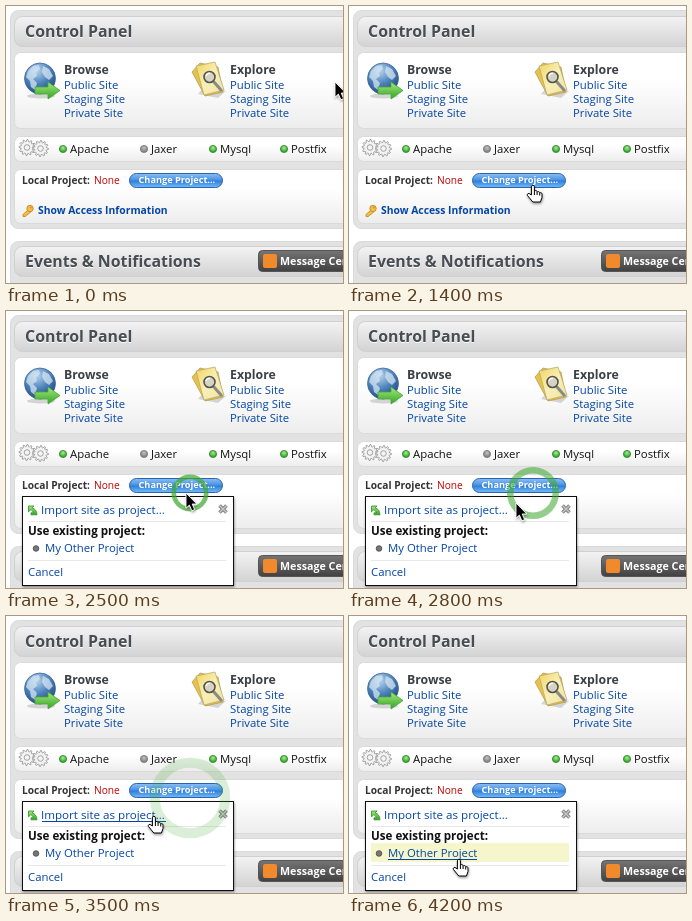
An HTML page that plays this animation: 337x277 px, repeating every 5.4 s.

```html
<!DOCTYPE html>
<html lang="en">
<head>
<meta charset="utf-8">
<title>Control Panel</title>
<style>
  html, body { margin: 0; width: 100%; height: 100%; overflow: hidden; background: #fff; }
  svg { display: block; }
  text { font: 11.35px "Open Sans", "Noto Sans", sans-serif; fill: #111; }
  .link { fill: #0345a4; }
  .bold { font-weight: 700; }
  .title { font-size: 15.9px; font-weight: 700; fill: #484c53; }
  .head { font-size: 12.3px; font-weight: 700; fill: #3c4047; }
  .small { font-size: 10.2px; }
  .box { fill: url(#soft); stroke: #dadada; }
  .bar { fill: url(#bar); stroke: #d0d0d0; }
  .panel { fill: #e2e2e2; stroke: #dadada; }
</style>
</head>
<body>
<svg width="337" height="277" viewBox="0 0 337 277">
  <defs>
    <linearGradient id="bar" x2="0" y2="1">
      <stop stop-color="#f3f3f3"/><stop offset="1" stop-color="#d3d3d3"/>
    </linearGradient>
    <linearGradient id="soft" x2="0" y2="1">
      <stop offset=".35" stop-color="#fff"/><stop offset="1" stop-color="#ededed"/>
    </linearGradient>
    <linearGradient id="blue" x2="0" y2="1">
      <stop stop-color="#8cc0f4"/><stop offset=".48" stop-color="#4790e4"/>
      <stop offset=".52" stop-color="#2f7cd8"/><stop offset="1" stop-color="#72bdf8"/>
    </linearGradient>
    <linearGradient id="dark" x2="0" y2="1">
      <stop stop-color="#757575"/><stop offset="1" stop-color="#414141"/>
    </linearGradient>
    <linearGradient id="leaf" x2="0" y2="1">
      <stop stop-color="#a5e878"/><stop offset="1" stop-color="#35a52a"/>
    </linearGradient>
    <linearGradient id="paper" x2="1" y2="1">
      <stop stop-color="#f0d460"/><stop offset=".5" stop-color="#f8f0b8"/><stop offset="1" stop-color="#efe3a0"/>
    </linearGradient>
    <radialGradient id="sea" cx=".4" cy=".25" r=".8">
      <stop stop-color="#b9d5ee"/><stop offset=".5" stop-color="#4f86bd"/><stop offset="1" stop-color="#1a457c"/>
    </radialGradient>
    <radialGradient id="on" cy=".35"><stop stop-color="#a6ee94"/><stop offset="1" stop-color="#36ad2f"/></radialGradient>
    <radialGradient id="off" cy=".35"><stop stop-color="#c2c2c2"/><stop offset="1" stop-color="#858585"/></radialGradient>
    <filter id="shade" x="-30%" y="-30%" width="180%" height="180%">
      <feDropShadow dx=".5" dy="1.5" stdDeviation="1.1" flood-opacity=".4"/>
    </filter>
  </defs>

  <rect class="panel" x="4.5" y="4.5" width="360" height="218" rx="8"/>
  <rect class="bar" x="8.5" y="10.5" width="360" height="30" rx="8"/>
  <rect class="box" x="8.5" y="46.5" width="360" height="76" rx="6"/>
  <rect class="box" x="8.5" y="130.5" width="360" height="25" rx="6"/>
  <rect class="box" x="8.5" y="163.5" width="360" height="54" rx="6"/>
  <rect class="panel" x="4.5" y="235.5" width="360" height="80" rx="8"/>
  <rect class="bar" x="8.5" y="240.5" width="360" height="30" rx="8"/>
  <g id="titles"></g>

  <!-- globe -->
  <ellipse cx="35" cy="90" rx="14" ry="2.5" fill="#000" opacity=".15"/>
  <circle cx="34" cy="72.5" r="15.5" fill="url(#sea)" stroke="#47699a" stroke-width=".8"/>
  <path d="M22 65l5-5 6-1 1 4-4 3 1 4-4 3 4 4-2 7-4-3-1-6-4-4zM37 60l6 3 4 7-4 4-4-3-3-5z" fill="#d4e4f0" opacity=".75"/>
  <path d="M29 81h13v-5l12 8.500-12 8.500v-5H29z" fill="url(#leaf)" stroke="#4aa63a" stroke-width=".8"/>

  <!-- note and lens -->
  <path d="M192 88l20 4 8-7-20-6z" fill="#000" opacity=".15"/>
  <path d="M186 66l8-9 18 4 5 25-18 4z" fill="#e6c24c" stroke="#b3964a" stroke-width=".7"/>
  <path d="M190 60l19-4 9 28-20 5z" fill="url(#paper)" stroke="#b5a468" stroke-width=".7"/>
  <path d="M208 76l7 8" stroke="#8a8a86" stroke-width="3" stroke-linecap="round"/>
  <circle cx="203.500" cy="71" r="5.500" fill="#d5d3c4" stroke="#55544c" stroke-width="1.600"/>
  <path d="M200 70a3.500 3.500 0 0 1 4-2.500" fill="none" stroke="#fff" stroke-width="1.300"/>

  <text class="head" x="58" y="68">Browse</text>
  <text class="head" x="224" y="68">Explore</text>
  <g id="sites"></g>

  <g id="gears" fill="#f4f4f4" stroke="#8d8d8d" stroke-width=".8"></g>
  <g id="services"></g>

  <text class="bold small" x="16" y="178" style="fill:#333">Local Project:</text>
  <text class="small" x="88" y="178" style="fill:#c00000">None</text>
  <rect x="123.500" y="167.500" width="93" height="14" rx="7" fill="url(#blue)" stroke="#2d63ae"/>
  <text class="bold" x="132.500" y="177" style="font-size:9.2px;fill:#fff">Change Project...</text>

  <g stroke="#c98a1e" fill="#f5bd4a" stroke-width=".9">
    <path d="M22 204l-5 4.500v2h2.500l1-1.500 1.500-.5 2.500-2.500z"/>
    <circle cx="24" cy="202.500" r="3.200"/>
    <circle cx="25" cy="201.500" r=".7" fill="#fff"/>
  </g>
  <text class="link bold" x="32" y="208" style="font-size:10.35px">Show Access Information</text>

  <rect x="252.500" y="244.500" width="110" height="21" rx="4" fill="url(#dark)" stroke="#555"/>
  <rect x="257" y="248" width="14" height="14" rx="2" fill="#f08a2c"/>
  <text class="bold" x="274" y="259" style="font-size:10.7px;fill:#fff">Message Center</text>

  <g id="menu">
    <rect x="16.500" y="185.500" width="211" height="89" fill="#fff" stroke="#111" filter="url(#shade)"/>
    <path d="M22 210.500h198M22 249.500h198" stroke="#e8e8e8"/>
    <rect id="row" x="22" y="227" width="198" height="19" fill="#f6f6cd"/>
    <path d="M22.500 195h5.500l-1.800 1.800c3 1.200 4.500 3 4.800 7h-6v-2h2.500c-.5-1.500-1.500-2.300-2.800-3l-2.200 2z" fill="url(#leaf)" stroke="#2c8c28" stroke-width=".8"/>
    <text class="link" x="35" y="203" style="font-size:11.6px">Import site as project...</text>
    <path id="line1" d="M36 205.500h124" stroke="#0345a4"/>
    <path d="M213.500 194.500l7 7m0-7l-7 7" stroke="#858585" stroke-width="3.600"/>
    <path d="M213.500 194.500l7 7m0-7l-7 7" stroke="#c8c8c8" stroke-width="1.300"/>
    <text class="bold" x="22" y="224" style="font-size:11.6px">Use existing project:</text>
    <circle cx="30" cy="237.500" r="2.800" fill="#777" stroke="#444" stroke-width=".8"/>
    <text class="link" x="39" y="241">My Other Project</text>
    <path id="line2" d="M39 243.500h89" stroke="#0345a4"/>
    <text class="link" x="22" y="265">Cancel</text>
  </g>

  <circle id="ring" cx="184" cy="182" fill="none" stroke="#40a830"/>

  <g id="cursor" filter="url(#shade)">
    <path id="arrow" d="M0 0V15.200L3.400 12.100 5.900 17.800 8.600 16.600 6.200 11H10.800Z" fill="#000" stroke="#fff" stroke-width=".9"/>
    <path id="hand" d="M-1.600 10V1.800a1.500 1.500 0 0 1 3 0V6.600a1.400 1.400 0 0 1 2.700 0V7.400a1.400 1.400 0 0 1 2.600 .2V8.400a1.200 1.200 0 0 1 2.300 .4V12.500L7.400 17H-.2L-5.600 10.400C-6.400 8.600-4.300 7.800-3 9ZM1.400 6.600V10M4.100 7.400V10M6.700 8.400V10.500" fill="#fff" stroke="#000"/>
  </g>
</svg>

<script>
const $ = id => document.getElementById(id);
const LOOP = 5400, STEP = 100;

// Static repeats
$('titles').innerHTML = [['Control Panel', 31], ['Events &amp; Notifications', 261]].map(([name, y]) =>
  `<text class="title" x="19" y="${y + 1}" style="fill:#fff">${name}</text>
   <text class="title" x="19" y="${y}">${name}</text>`).join('');

$('sites').innerHTML = [58, 224].map(x =>
  ['Public', 'Staging', 'Private'].map((name, i) =>
    `<text class="link" x="${x}" y="${83 + 14 * i}">${name} Site</text>`).join('')).join('');

$('services').innerHTML = [
  ['Apache', 57, 'on'], ['Jaxer', 138, 'off'], ['Mysql', 207, 'on'], ['Postfix', 278, 'on']
].map(([name, x, state]) =>
  `<circle cx="${x}" cy="143" r="3.6" fill="url(#${state})" stroke="${state === 'on' ? '#37822f' : '#777'}" stroke-width=".8"/>
   <text x="${x + 7}" y="147">${name}</text>`).join('');

function gear(cx, cy, r, teeth) {
  const points = [];
  for (let i = 0; i < teeth * 4; i++) {
    const a = i / (teeth * 4) * Math.PI * 2, d = i % 4 < 2 ? r : r - 2;
    points.push((cx + d * Math.cos(a)).toFixed(1) + ',' + (cy + d * Math.sin(a)).toFixed(1));
  }
  return `<polygon points="${points.join(' ')}"/><circle cx="${cx}" cy="${cy}" r="${r * .35}"/>`;
}
$('gears').innerHTML = gear(21, 141.5, 8, 12) + gear(34.5, 142.5, 8, 12);

// Cursor legs: start time, number of steps, end point, power of the vertical ease-out
const START = [329, 76];
const LEGS = [
  [600, 6, 209, 183, 3],
  [1200, 3, 184, 179, 1],
  [2500, 6, 159, 198, 1],
  [3100, 6, 146, 200, 1],
  [3700, 6, 110, 243, 1]
];
const RADII = [[1900, 2], [2400, 16], [3000, 31], [3700, 44]];

function cursorAt(t) {
  let [x, y] = START;
  for (const [at, steps, toX, toY, power] of LEGS) {
    if (t < at) break;
    const p = Math.min(1, ((t - at) / STEP + 1) / steps);
    x += (toX - x) * p;
    y += (toY - y) * (1 - (1 - p) ** power);
  }
  return [x, y];
}

function radiusAt(t) {
  for (let i = 1; i < RADII.length; i++) {
    const [t0, r0] = RADII[i - 1], [t1, r1] = RADII[i];
    if (t <= t1) return r0 + (r1 - r0) * (t - t0) / (t1 - t0);
  }
  return 0;
}

const show = (id, on) => $(id).style.display = on ? '' : 'none';

function draw(time) {
  const t = Math.floor(time % LOOP / STEP) * STEP;
  const onButton = t >= 1300 && t < 2500;
  const onImport = t >= 3100 && t < 3700;
  const onRow = t >= 4000;
  const over = onButton || onImport || onRow;

  show('menu', t >= 1900);
  show('line1', onImport);
  show('line2', onRow);
  show('row', onRow);
  show('hand', over);
  show('arrow', !over);
  $('cursor').setAttribute('transform', `translate(${cursorAt(t).map(Math.round)})`);

  const ringOn = t >= 1900 && t <= 3700;
  show('ring', ringOn);
  if (ringOn) {
    const outer = radiusAt(t), width = outer / 4;
    $('ring').setAttribute('r', outer - width / 2);
    $('ring').setAttribute('stroke-width', width);
    $('ring').setAttribute('opacity', Math.min(1, 1.03 - (t - 1900) / 1900));
  }
}

const begin = performance.now();
function tick() {
  draw(performance.now() - begin);
  requestAnimationFrame(tick);
}
tick();
</script>
</body>
</html>
```
